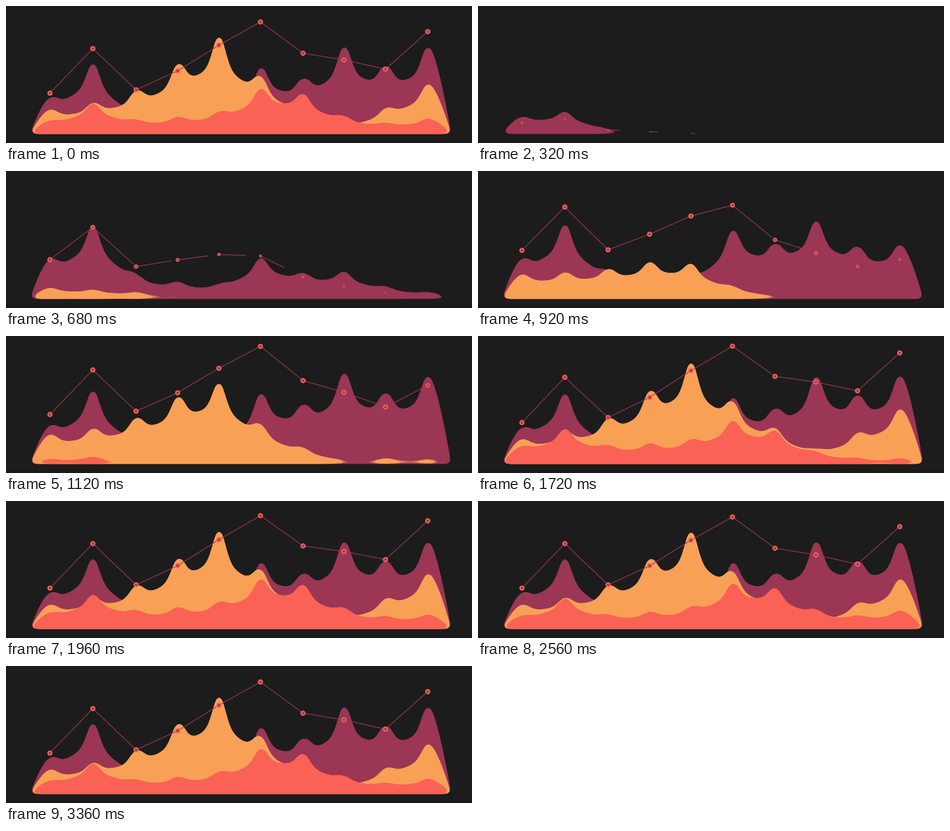
A matplotlib script that plays this animation: 695 by 206 pixels, repeating every 4.36 s.

```python
import numpy as np
import matplotlib.pyplot as plt
from matplotlib.animation import FuncAnimation
from matplotlib.collections import LineCollection
from matplotlib.colors import to_rgb

W, H, DPI = 695, 206, 100
STEP, FRAMES = 40, 109
PX = 72 / DPI
BG, STRIP = "#1c1c1c", "#191919"
PURPLE, ORANGE, RED = "#9b3655", "#f8a056", "#fa6256"

SIGMA, CUT = 4.2, 0.42        # goo: blur, then threshold
BASE = 191.6
LEFT, RIGHT = 37, 663
N = 10
X = np.array([65.5, 129.5, 194, 256, 317.5, 379.5, 443, 504, 566, 629])
ORDER = np.arange(N)

# Settled heights, start, delay from point to point, pace, overshoot in px.
LAYERS = [
    (PURPLE, [52, 105.5, 33, 26, 26, 99, 80, 130, 99, 129], 20, 60, 0.75, 6),
    (ORANGE, [35, 45, 63, 103, 145, 84, 44, 12, 37, 74], 370, 68, 0.8, 8),
    (RED, [18, 45, 19.5, 24, 31.5, 67, 59, 25, 15, 21.5], 840, 68, 0.8, 7),
]
DOTS = ([61, 128, 66, 94.5, 133, 168, 121, 111, 97, 153.5], 20, 60, 1, 13)
DOT_GROW = 640


def smooth(t, a, b):
    u = np.clip((t - a) / (b - a), 0, 1)
    return u * u * (3 - 2 * u)


def heights(t, final, start, delay, pace, over):
    """Points rise one after another, swell past their height and settle."""
    e = (t - start - delay * ORDER) / pace
    swell = smooth(e, 500, 1000) * (1 - smooth(e, 1150, 1800))
    return np.array(final) * smooth(e, 40, 800) + over * swell


def blur_matrix(n):
    d = np.subtract.outer(np.arange(n), np.arange(n))
    return np.exp(-d**2 / (2 * SIGMA**2)) / (SIGMA * np.sqrt(2 * np.pi))


BLUR_X, BLUR_Y = blur_matrix(W), blur_matrix(H)
ROWS = np.arange(H)[:, None]
COLS = np.arange(W) + 0.5
PEAKS = X + 0.5

# Between peaks the skyline sags; each peak is a narrow bell.
bells = np.exp(-((COLS[:, None] - PEAKS) / 13)**2).sum(axis=1)
SAG = 0.69 + 0.31 * np.minimum(bells, 1)
out_left = np.clip((PEAKS[0] - COLS) / (PEAKS[0] - LEFT), 0, 1)
out_right = np.clip((COLS - PEAKS[-1]) / (RIGHT - PEAKS[-1]), 0, 1)
OUTER = np.maximum(out_left, out_right)
SHAPE = np.where(OUTER > 0, 1 - OUTER**1.5, SAG)


def goo(h):
    """Opacity of a layer: skyline filled to the base, blurred and cut."""
    top = BASE - 1.02 * np.interp(COLS, PEAKS, h) * SHAPE
    fill = np.clip(ROWS + 1 - top, 0, 1) * np.clip(BASE - ROWS, 0, 1)
    field = BLUR_Y @ fill @ BLUR_X
    return np.clip((field - CUT) * 14 + 0.5, 0, 1)[..., None]


backdrop = np.empty((H, W, 3))
backdrop[:] = to_rgb(BG)
backdrop[202:] = to_rgb(STRIP)

fig = plt.figure(figsize=(W / DPI, H / DPI), dpi=DPI, facecolor=BG)
ax = fig.add_axes([0, 0, 1, 1])
ax.set_axis_off()
picture = ax.imshow(backdrop, extent=(0, W, H, 0), aspect="auto",
                    interpolation="nearest")
ax.set_xlim(0, W)
ax.set_ylim(H, 0)
links = LineCollection([], colors=PURPLE, linewidths=1.1 * PX, zorder=2)
ax.add_collection(links)
dots = ax.scatter(X, X, facecolors=PURPLE, edgecolors=RED, zorder=3)


def draw(n):
    t = (n or FRAMES) * STEP      # the loop opens on the finished chart
    img = backdrop
    for color, *motion in LAYERS:
        a = goo(heights(t, *motion))
        img = img * (1 - a) + np.array(to_rgb(color)) * a
    picture.set_data(np.clip(img, 0, 1))

    _, start, delay, *_ = DOTS
    grow = np.clip((t - start - delay * ORDER) / DOT_GROW, 0, 1)
    pts = np.column_stack([X, 192 - heights(t, *DOTS)])
    ends = pts[:-1] + np.diff(pts, axis=0) * grow[:-1, None]
    links.set_segments([s for s, g in zip(np.stack([pts[:-1], ends], axis=1),
                                          grow) if g > 0])
    dots.set_offsets(pts)
    dots.set_sizes((2 * 2.9 * PX * grow)**2)
    dots.set_linewidths(1.9 * PX * grow)
    return picture, links, dots


anim = FuncAnimation(fig, draw, frames=FRAMES, interval=STEP, repeat=True,
                     repeat_delay=0, blit=False)
plt.show()
```
